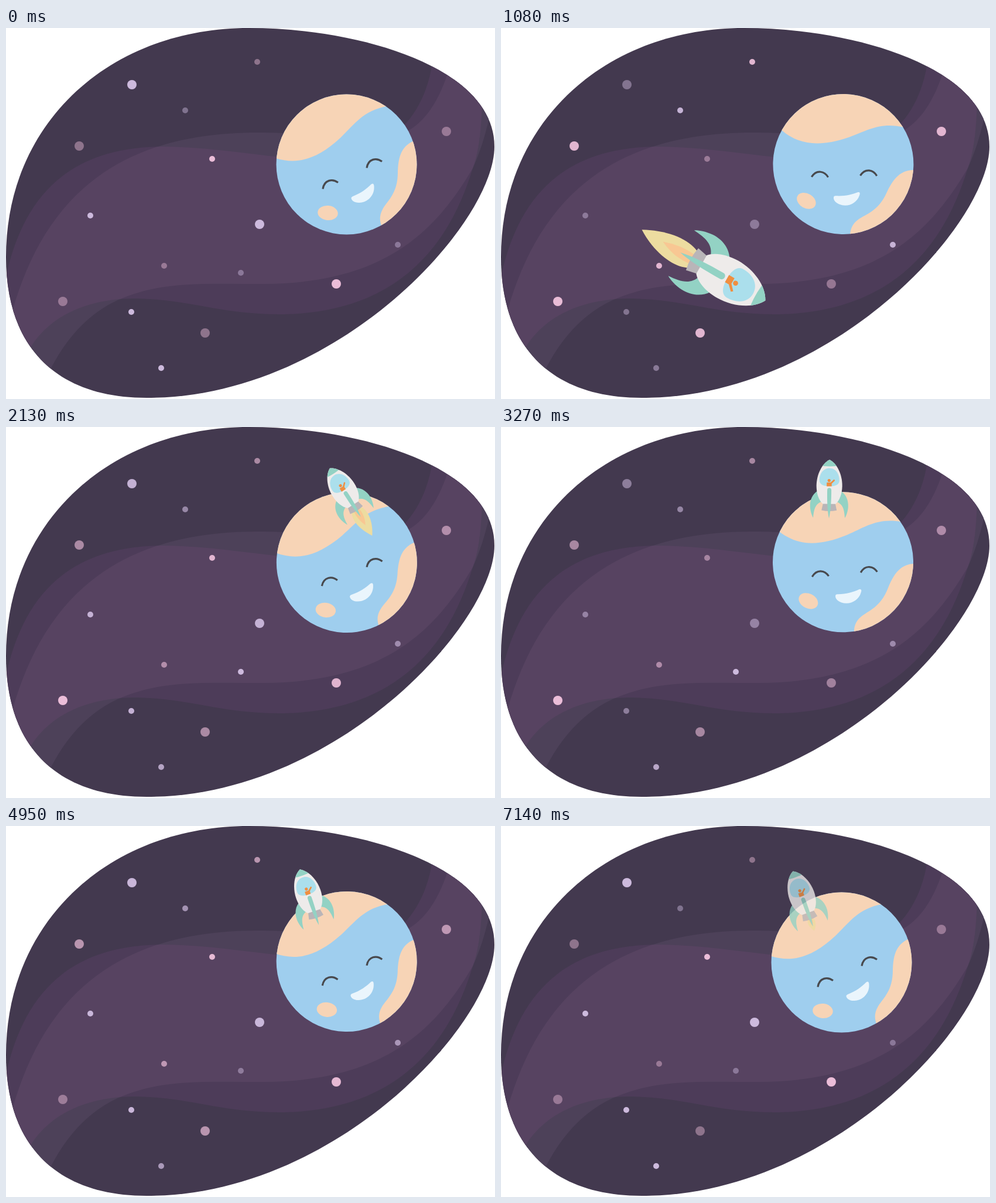
Write an HTML page that moves like this. It is 835x635 px and loops after 7.17 s.

```html
<!DOCTYPE html>
<html lang="en">
<head>
<meta charset="utf-8">
<title>Rocket visits a happy planet</title>
<style>
  html, body { margin: 0; width: 100%; height: 100%; overflow: hidden; background: #fff; }
  svg { display: block; width: 835px; height: 635px; }
</style>
</head>
<body>
<svg viewBox="0 0 835 635">
  <defs>
    <path id="blob" d="M415 0C600 0 834 66 834 203C834 335 565 633 240 633C85 633 0 545 0 392C0 160 180 0 415 0Z"/>
    <path id="bandA" d="M0 425C30 290 105 203 270 203C350 204 420 217 480 222C590 231 705 205 728 60L815 60C812 110 816 190 797 240C765 345 690 490 465 490C365 490 310 463 215 463C120 465 65 505 38 553L-20 560Z"/>
    <path id="bandB" d="M10 488C65 290 190 179 430 179C520 178 590 195 640 190C700 186 735 140 756 72L840 72C830 140 818 195 797 240C735 345 650 437 440 438C330 438 265 433 190 466C135 492 98 538 72 592L-10 640Z"/>
    <clipPath id="inBlob"><use href="#blob"/></clipPath>
    <clipPath id="inBandA"><use href="#bandA"/></clipPath>
    <clipPath id="inPlanet"><circle r="120"/></clipPath>
    <clipPath id="inHull"><use href="#hull"/></clipPath>
    <path id="hull" d="M0-87.5C13-81 22-62 22-43C22-30 18-18 11-12H-11C-18-18-22-30-22-43C-22-62-13-81 0-87.5Z"/>
    <path id="fin" d="M-20-34C-29-28-33-18-32.500-7C-32 1-29.500 8-27 12C-26-2-24-12-12-16Z"/>
    <path id="eye" d="M-40.500 42C-38 26-24 24-14.500 31"/>
  </defs>

  <use href="#blob" fill="#43394f"/>
  <g clip-path="url(#inBlob)">
    <use href="#bandA" fill="#4d3c59"/>
    <use href="#bandB" fill="#4d4159"/>
    <g clip-path="url(#inBandA)"><use href="#bandB" fill="#574361"/></g>
  </g>
  <g id="stars"></g>

  <g id="planet">
    <circle r="120" fill="#9fceee"/>
    <g clip-path="url(#inPlanet)" fill="#f7d4b6">
      <path d="M-125-12C-90 0-55-4-10-46C15-70 28-92 70-100V-130H-130Z"/>
      <path d="M114-40C92-30 88-10 87.500 15C87 50 70 62 62 76C55 88 57 98 60 106L130 110V-45Z"/>
    </g>
    <ellipse cx="-32" cy="83" rx="17.300" ry="12.500" transform="rotate(6 -32 83)" fill="#f7d4b6"/>
    <g fill="none" stroke="#48494d" stroke-width="3.200">
      <use href="#eye"/>
      <use href="#eye" x="75" y="-36"/>
    </g>
    <path d="M8 57Q9 55 11 54.500C25 49 34 42 42 34C45 32 47 33 47 38C48 52 37 65 22 65.500C14 66 8 62 8 57Z" fill="#eaf5fc"/>
  </g>

  <g id="rocket">
    <g id="flame">
      <path d="M-9-3C-16 10-15 33-1 59C14 36 17 10 9-3Z" fill="#eddca0"/>
      <path d="M-5-2C-7 10-5 22-1 34C5 22 7 10 5-2Z" fill="#f8c793"/>
    </g>
    <g fill="#93d2c4">
      <use href="#fin"/>
      <use href="#fin" transform="scale(-1 1)"/>
    </g>
    <path d="M-10.500-12.500H10.500L13-1Q0 2-13-1Z" fill="#b9b5b8"/>
    <use href="#hull" fill="#eeebea"/>
    <path d="M-20-95H20V-78Q0-74-20-78Z" fill="#93d2c4" clip-path="url(#inHull)"/>
    <path d="M0-73C11-73 17-63 17-52C17-45 10-42 0-42C-10-42-17-45-17-52C-17-63-11-73 0-73Z" fill="#abdfec"/>
    <g fill="#f08e40">
      <circle cx="-.5" cy="-52" r="2.600"/>
      <path d="M-4.500-48.500H2L8-54L9.500-52L4-46.500V-42H-4.500Z"/>
    </g>
    <path d="M-3.500-36C-3.500-40.500 3.500-40.500 3.500-36C3.700-18 3 0 0 13C-3 0-3.700-18-3.500-36Z" fill="#93d2c4"/>
  </g>
</svg>

<script>
const LOOP = 7170, STEP = 30, TOUCHDOWN = 3150;
const byId = id => document.getElementById(id);
const clamp = v => Math.max(0, Math.min(1, v));
const wave = x => (1 - Math.cos(2 * Math.PI * x)) / 2;
const rad = deg => deg * Math.PI / 180;

// Twinkle patterns: brightness 0..1 over the loop.
const twinkles = {
  slow: t => 1 - wave(3 * t / LOOP),
  quick: t => wave(4 * t / LOOP),
  counter: t => 1 - wave(4 * t / LOOP),
  pause: t => t > LOOP / 6 && t < LOOP / 2 ? 1 : wave(3 * t / LOOP)
};
const LILAC = '#cdbadd', PINK = '#ebbdd8';
const stars = [
  [215, 97, 8, LILAC, 'slow'], [352, 224, 5, PINK, 'slow'], [144, 321, 5, LILAC, 'slow'],
  [433, 336, 8, LILAC, 'slow'], [214, 486, 5, LILAC, 'slow'], [564, 438, 8, PINK, 'slow'],
  [429, 58, 5, PINK, 'quick'], [125, 202, 8, PINK, 'quick'], [340, 522, 8, PINK, 'quick'],
  [270, 407, 5, PINK, 'quick'], [752, 177, 8, PINK, 'quick'], [306, 141, 5, LILAC, 'quick'],
  [669, 371, 5, LILAC, 'quick'], [265, 582, 5, LILAC, 'counter'],
  [97, 468, 8, PINK, 'pause'], [401, 419, 5, LILAC, 'pause']
].map(([cx, cy, r, fill, twinkle]) => {
  const el = document.createElementNS('http://www.w3.org/2000/svg', 'circle');
  for (const [k, v] of Object.entries({ cx, cy, r, fill })) el.setAttribute(k, v);
  byId('stars').append(el);
  return { el, level: twinkles[twinkle] };
});

function planetPose(t) {
  const sway = wave(3 * t / LOOP);
  return { x: 581.5 + 3 * sway, y: 233.5 - 2.2 * wave(t / LOOP), angle: 24.6 * sway };
}

// Rocket standing on the planet, lifted along its own axis.
function docked(t, lift = 0) {
  const p = planetPose(t), a = rad(p.angle), heading = p.angle - 20, h = rad(heading);
  const dx = -53.2, dy = -73.8;
  return [
    p.x + dx * Math.cos(a) - dy * Math.sin(a) + lift * Math.sin(h),
    p.y + dx * Math.sin(a) + dy * Math.cos(a) - lift * Math.cos(h),
    heading, 1
  ];
}

// time, x, y, heading, scale, flame
const flight = [
  [300, -235, 95, 116, 1.7, 1],
  [735, 90, 262, 117, 1.68, 1],
  [1080, 325, 395, 119.5, 1.66, 1],
  [1330, 495, 460, 96, 1.5, 1],
  [1600, 660, 400, 32, 1.25, 0.95],
  [1850, 685, 275, -8, 1.1, 0.9],
  [2130, 599, 143, -32.6, 0.98, 0.87],
  [2400, 543, 109, -27, 1, 0.75],
  [2600, ...docked(2600, 62), 0.6],
  [2890, ...docked(2890, 42), 0.35],
  [TOUCHDOWN, ...docked(TOUCHDOWN), 0]
];

function spline(keys, t) {
  const last = keys.length - 1;
  let i = 0;
  while (i < last - 1 && t > keys[i + 1][0]) i++;
  const a = keys[i], b = keys[i + 1], before = keys[Math.max(0, i - 1)], after = keys[Math.min(last, i + 2)];
  const span = b[0] - a[0], u = clamp((t - a[0]) / span), v = 1 - u;
  return a.slice(1).map((p, j) => {
    const k = j + 1;
    const m0 = (b[k] - before[k]) / (b[0] - before[0]) * span;
    const m1 = (after[k] - a[k]) / (after[0] - a[0]) * span;
    return v * v * (1 + 2 * u) * p + u * u * (3 - 2 * u) * b[k] + u * v * (v * m0 - u * m1);
  });
}

function draw(t) {
  for (const s of stars) s.el.setAttribute('opacity', 0.45 + 0.55 * s.level(t));

  const p = planetPose(t);
  byId('planet').setAttribute('transform', `translate(${p.x} ${p.y}) rotate(${p.angle})`);

  const landed = t >= TOUCHDOWN;
  const [x, y, heading, scale, flame] = landed
    ? [...docked(t), t >= LOOP - STEP ? 0.35 : 0]
    : spline(flight, t);
  const rocket = byId('rocket');
  rocket.setAttribute('transform', `translate(${x} ${y}) rotate(${heading}) scale(${scale})`);
  rocket.setAttribute('opacity', t < flight[0][0] ? 0 : clamp((LOOP - t) / 38));
  byId('flame').setAttribute('transform', `scale(${Math.max(0, Math.min(1, flame * 1.4))} ${Math.max(0, flame)})`);
}

const start = performance.now();
function tick() {
  const t = (performance.now() - start) % LOOP;
  draw(Math.floor(t / STEP) * STEP);
  requestAnimationFrame(tick);
}
tick();
</script>
</body>
</html>
```
